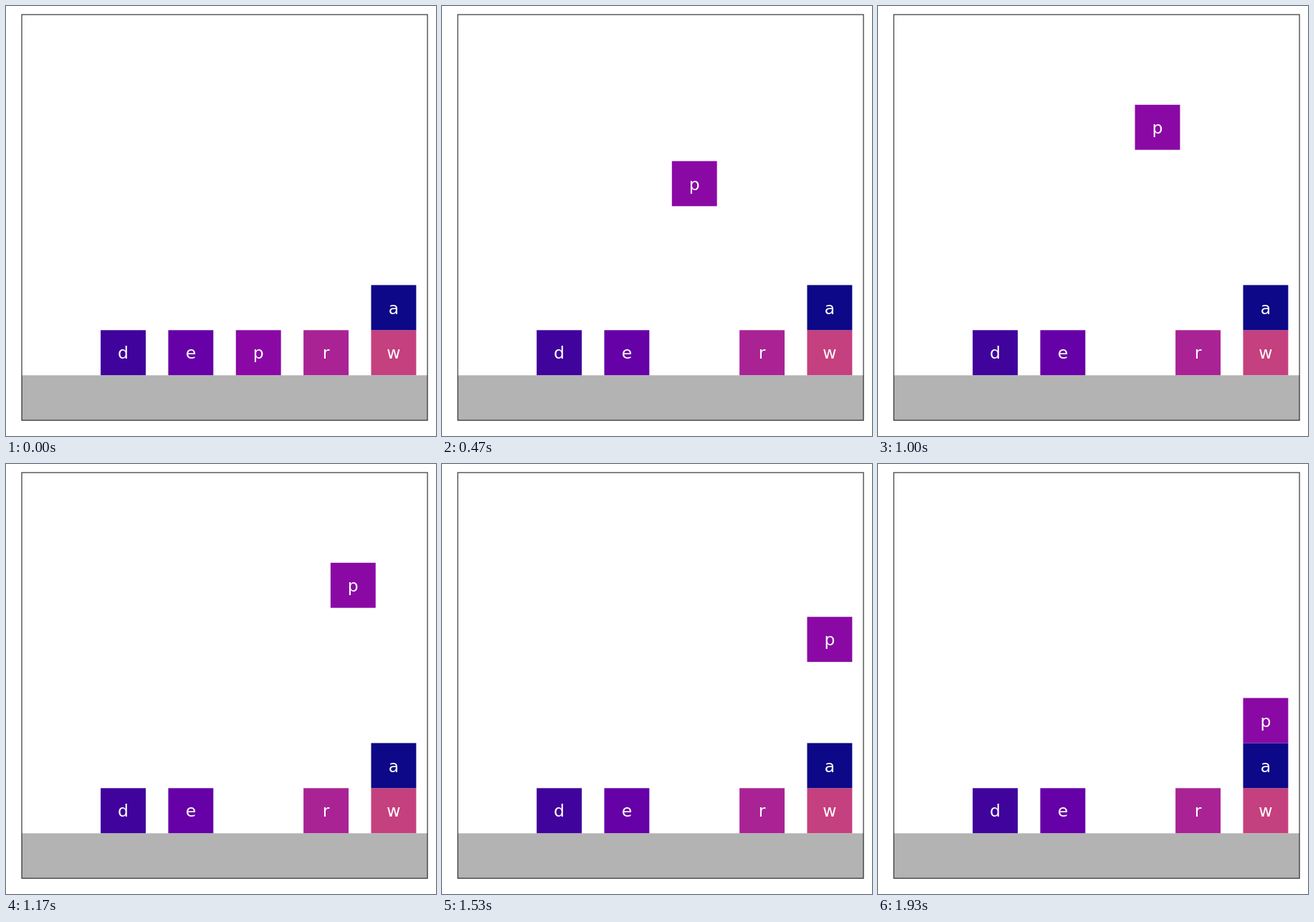
These frames come from a looping animation (600 px wide and 600 px high, 1.96 s). An HTML page:

```html
<!DOCTYPE html>
<html lang="en">
<head>
<meta charset="utf-8">
<title>Stacking blocks</title>
<style>
  html, body { margin: 0; width: 100%; height: 100%; overflow: hidden; background: #fff; }
  svg { display: block; width: 100%; height: 100%; }
  text { font: 23.5px "DejaVu Sans", sans-serif; fill: #fff; text-anchor: middle; }
</style>
</head>
<body>
<svg id="stage" viewBox="0 0 600 600">
  <rect x="22" y="515.3" width="566.1" height="62.9" fill="#b3b3b3"/>
  <g id="blocks"></g>
  <rect x="22" y="12" width="566.1" height="566.1" fill="none" stroke="#000" stroke-opacity=".8" stroke-width="1.2"/>
</svg>
<script>
const NS = "http://www.w3.org/2000/svg";
const LOOP = 1960;
const UNIT = 62.9, LEFT = 22, TOP = 12;

// label, colour, column, row (columns are 1.5 units apart)
const BLOCKS = [
  ["d", "#40039c", 0, 7],
  ["e", "#6600a7", 1, 7],
  ["r", "#a92395", 3, 7],
  ["w", "#c5407e", 4, 7],
  ["a", "#0d0887", 4, 6],
  ["p", "#8a09a5", 2, 7]
];

const clamp = (v, max) => Math.min(Math.max(v, 0), max);
const colX = col => 1.75 + 1.5 * col;

function add(parent, tag, attrs) {
  const el = document.createElementNS(NS, tag);
  for (const key in attrs) el.setAttribute(key, attrs[key]);
  return parent.appendChild(el);
}

function place(el, x, y) {
  el.setAttribute("transform", `translate(${LEFT + x * UNIT} ${TOP + y * UNIT})`);
}

function makeBlock([label, fill, col, row]) {
  const g = add(document.getElementById("blocks"), "g", {});
  add(g, "rect", { width: UNIT, height: UNIT, fill });
  add(g, "text", { x: UNIT / 2, y: 40.2 }).textContent = label;
  place(g, colX(col), row);
  return g;
}

const mover = BLOCKS.map(makeBlock).pop();

// 30 ticks per second, rounded to 10 ms
const tickAt = ms => Math.floor((Math.floor(ms / 10) * 3 + 1) / 10);

function draw() {
  const n = tickAt(performance.now() % LOOP);
  // lifting and sliding each start with a double step
  const lift = n < 1 ? 0 : clamp(n + 1, 20);
  const slide = n < 30 ? 0 : clamp(n - 28, 10);
  const drop = clamp(n - 38, 20);
  place(mover, colX(2) + slide * 0.3, 7 - lift * 0.25 + drop * 0.15);
  requestAnimationFrame(draw);
}
draw();
</script>
</body>
</html>
```
